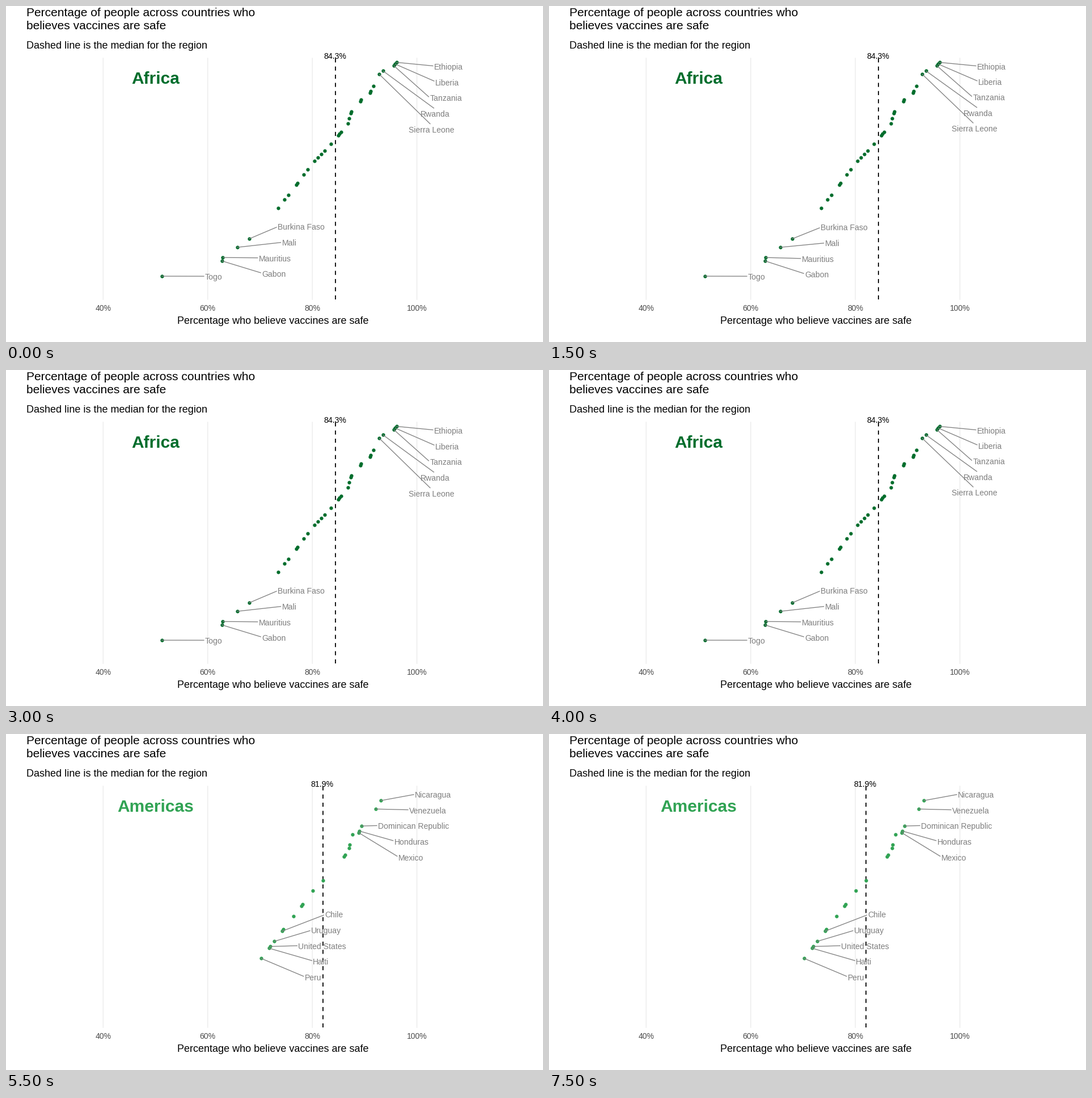
Animation, 947 px wide and 592 px high, one loop 8 s. Source, as a matplotlib script:

```python
import numpy as np
import matplotlib.pyplot as plt
from matplotlib.animation import FuncAnimation

W, H, DPI = 947, 592, 64
PX = 72 / DPI  # points per pixel
GREY = "#7f7f7f"
TOP, BOTTOM = 92, 517
ROW = 27.7  # distance between stacked labels
NUDGE = 91.7  # labels sit this far right of their dot

# World curve: share of believers by rank, linear between these
CURVE_RANK = [0, 2, 5, 7, 18, 21, 25, 26, 36, 48, 59, 72, 83, 99, 115, 117, 126]
CURVE_SHARE = [96.1, 95.6, 93.5, 92.8, 91, 89.4, 88.9, 87.7, 86.8,
               83.6, 80.1, 76.9, 74.2, 70.2, 62.9, 62.7, 51.2]

plt.rcParams["font.family"] = "Liberation Sans"
fig = plt.figure(figsize=(W / DPI, H / DPI), dpi=DPI, facecolor="white")
ax = fig.add_axes([0, 0, 1, 1])
ax.set_xlim(0, W)
ax.set_ylim(H, 0)
ax.axis("off")


def share_x(share):
    return 171.3 + 9.222 * (share - 40)


def dot_xy(ranks):
    ranks = np.asarray(ranks)
    return share_x(np.interp(ranks, CURVE_RANK, CURVE_SHARE)), 99.3 + 2.99 * ranks


def text(x, y, s, size, color="black", ha="center", **kw):
    return ax.text(x, y, s, fontsize=size * PX, color=color, ha=ha,
                   va="baseline", **kw)


def line(xs, ys, color, width, z, **kw):
    return ax.plot(xs, ys, color=color, lw=width * PX, zorder=z, **kw)[0]


def wave(n, period, peak):
    return np.cos(2 * np.pi * (n - peak) / period)


class Label:
    """A name to the right of its dot, with a connecting line."""

    def __init__(self, name, x, y):
        self.dot = x, y
        self.x = x + NUDGE
        self.name = text(self.x, y, name, 14, GREY, zorder=5)
        self.left = self.x - self.name.get_window_extent().width / 2 - 2
        self.link = line([], [], GREY, 1.3, 4)

    def move(self, y):
        dx, dy = self.dot
        if y - dy > self.left - dx:  # steep lines meet the top of the name
            end = self.x - 2, y - 10
        else:
            end = self.left, y - 0.8 + np.clip((dy - y) / 15, -1.5, 1.5)
        self.name.set_position((self.x, y + 5))
        self.link.set_data([dx, end[0]], [dy, end[1]])


class Region:
    def __init__(self, name, color, median, ranks, stacks, squeeze, swing):
        """stacks: (names, first dot, y); swing: (size, period, peak)."""
        self.squeeze, self.swing = squeeze, swing
        xs, ys = dot_xy(ranks)
        dots = ax.scatter(xs, ys, s=(6.3 * PX) ** 2, color=color, lw=0, zorder=3)
        mx = share_x(median)
        dash = line([mx + 1] * 2, [BOTTOM, TOP], "black", 1.8, 2,
                    dashes=(4, 4), dash_capstyle="butt")
        title = text(263.5, 137, name, 30, color, weight="bold")
        value = text(mx, 93, f"{median}%", 14.1)
        self.stacks = [
            (y, [Label(s, xs[first + i], ys[first + i])
                 for i, s in enumerate(names)])
            for names, first, y in stacks]
        self.artists = [dots, dash, title, value]
        for _, labels in self.stacks:
            for label in labels:
                self.artists += [label.name, label.link]

    def show(self, visible):
        for artist in self.artists:
            artist.set_visible(visible)

    def pose(self, n):
        size, period, peak = self.swing
        # The upper stack tightens now and then, the lower one bobs
        rows = [ROW - self.squeeze * max(0, wave(n, 5, 3)) ** 3, ROW, ROW]
        bobs = [0, size * wave(n, period, peak), 0]
        for (y, labels), row, bob in zip(self.stacks, rows, bobs):
            for i, label in enumerate(labels):
                label.move(y + bob + row * i)


for share in range(40, 101, 20):
    x = share_x(share)
    line([x, x], [TOP, BOTTOM], "#ebebeb", 1.4, 1, snap=False)
    text(x, 537, f"{share}%", 14, "#4d4d4d")

text(36, 17.5, "Percentage of people across countries who", 21, ha="left")
text(36, 41, "believes vaccines are safe", 21, ha="left")
text(36, 75, "Dashed line is the median for the region", 18, ha="left")
text(471, 560, "Percentage who believe vaccines are safe", 18)

africa = Region(
    "Africa", "#006d2c", 84.3,
    [0, 1, 2, 5, 7, 14, 17, 18, 22, 23, 29, 30, 33, 36, 41, 42, 43, 48, 52,
     54, 56, 58, 63, 66, 71, 72, 78, 81, 86, 104, 109, 115, 117, 126],
    [(["Ethiopia", "Liberia", "Tanzania", "Rwanda", "Sierra Leone"], 0, 106.8),
     (["Burkina Faso", "Mali", "Mauritius", "Gabon"], 29, 389.8),
     (["Togo"], 33, 477)],
    squeeze=0.4, swing=(0.6, 2, 1))

americas = Region(
    "Americas", "#31a354", 81.9,
    [6, 11, 21, 24, 25, 26, 32, 34, 38, 39, 53, 59, 67, 68, 74, 82, 83, 89,
     92, 93, 99],
    [(["Nicaragua", "Venezuela", "Dominican Republic", "Honduras", "Mexico"],
      0, 106.8),
     (["Chile", "Uruguay", "United States", "Haiti", "Peru"], 16, 319)],
    squeeze=0, swing=(0.6, 4, 13))

FRAMES, SWITCH = 16, 11


def update(n):
    active = africa if n < SWITCH else americas
    for region in (africa, americas):
        region.show(region is active)
    active.pose(n)
    return active.artists


anim = FuncAnimation(fig, update, frames=FRAMES, interval=500, repeat=True)
plt.show()
```
